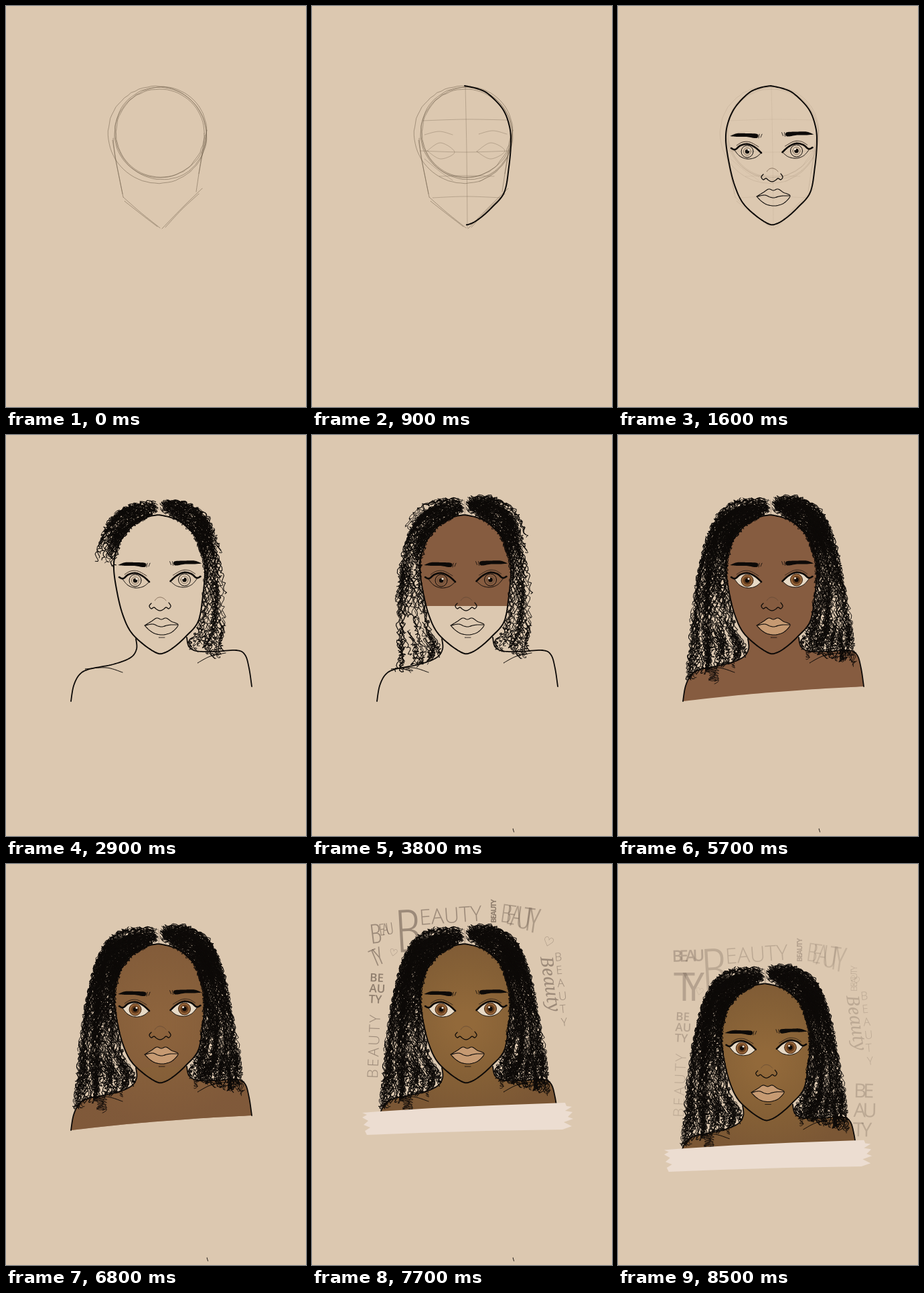
These frames come from a looping animation (448x598 px, 8600 ms). An HTML page with a canvas:

```html
<!DOCTYPE html>
<html lang="en">
<head>
<meta charset="utf-8">
<title>Portrait drawing</title>
<style>
  html, body { margin: 0; width: 100%; height: 100%; overflow: hidden; background: #dcc8b0; }
  canvas { display: block; width: 448px; height: 598px; }
</style>
</head>
<body>
<canvas id="stage" width="448" height="598"></canvas>
<script>
const ctx = document.getElementById('stage').getContext('2d');
const LOOP = 8600, STEP = 100;
const PAPER = '#dcc8b0', INK = '#0d0a08', PENCIL = '#74634f';

let seed = 7;
function rand(a = 0, b = 1) {
  seed = (seed * 1664525 + 1013904223) % 4294967296;
  return a + (b - a) * seed / 4294967296;
}
const lerp = (a, b, k) => a + (b - a) * k;
const ramp = (t, from, to) => Math.min(1, Math.max(0, (t - from) / (to - from)));

// Catmull-Rom curve through flat x,y pairs, sampled as points
function curve(flat, samples = 10) {
  const p = [], out = [];
  for (let i = 0; i < flat.length; i += 2) p.push([flat[i], flat[i + 1]]);
  for (let i = 0; i < p.length - 1; i++) {
    const a = p[Math.max(0, i - 1)], b = p[i], c = p[i + 1], d = p[Math.min(p.length - 1, i + 2)];
    for (let s = 0; s < samples; s++) {
      const k = s / samples;
      out.push([0, 1].map(j => b[j] + .5 * k * (c[j] - a[j] + k * (2 * a[j] - 5 * b[j] + 4 * c[j] - d[j]
        + k * (3 * (b[j] - c[j]) + d[j] - a[j])))));
    }
  }
  out.push(p[p.length - 1]);
  return out;
}

function along(points, v) {
  const f = Math.min(.9999, Math.max(0, v)) * (points.length - 1), i = Math.floor(f);
  return [lerp(points[i][0], points[i + 1][0], f - i), lerp(points[i][1], points[i + 1][1], f - i)];
}

function trace(points, part = 1) {
  ctx.beginPath();
  const n = Math.ceil(points.length * part);
  for (let i = 0; i < n; i++) ctx.lineTo(...points[i]);
}
function line(points, part = 1, width = 1.4, color = INK) {
  if (part <= 0) return;
  trace(points, part);
  ctx.lineWidth = width;
  ctx.strokeStyle = color;
  ctx.stroke();
}
function fill(points, color) {
  trace(points);
  ctx.fillStyle = color;
  ctx.fill();
}

// ---- Face and body ----
const face = curve([228,119, 246,123, 263,131, 285,154, 295,180, 297,205, 294,240, 287,278, 268,301, 250,317,
  236,325, 225,325, 205,312, 186,293, 174,267, 166,235, 161,200, 164,175, 175,151, 195,130, 212,122, 228,119]);
const leftShoulder = curve([194,304, 195,319, 186,332, 160,342, 125,349, 110,357, 101,374, 97,397]);
const rightShoulder = curve([270,302, 273,315, 284,322, 310,323, 344,321, 357,328, 363,348, 367,375]);
const collarbones = [curve([118,349, 150,347, 174,354]), curve([286,340, 305,330, 328,325])];
const body = [...leftShoulder, ...curve([97,397, 180,388, 280,380, 367,375]), ...[...rightShoulder].reverse()];

const lidTop = curve([169,212, 175,214, 183,208, 194,206, 205,211, 214,219]);
const lidBottom = curve([214,219, 205,226, 193,228, 182,224, 174,215]);
const crease = curve([177,208, 186,203, 197,203, 210,210]);
const brow = curve([167,194, 178,190, 192,190, 208,191, 207,197, 192,195, 178,195, 167,194]);
const nose = [
  curve([217,251, 214,255, 217,259, 221,257, 225,260, 230,262, 235,260, 239,257, 243,259, 246,255, 243,250]),
];
const noseTip = curve([222,247, 226,243, 231,242, 236,244, 239,247]);
const lips = curve([207,284, 217,278, 225,273, 232,275, 239,273, 247,278, 257,283, 249,293, 240,297, 232,298,
  222,296, 214,291, 207,284]);
const mouth = curve([208,284, 219,282, 227,285, 233,286, 240,284, 247,283, 256,283]);

function mirrored(side, draw) {
  ctx.save();
  if (side) { ctx.translate(459.5, -1); ctx.scale(-1, 1); }
  draw();
  ctx.restore();
}

function circle(x, y, r, color, width) {
  ctx.beginPath();
  ctx.arc(x, y, r, 0, 7);
  if (width) { ctx.lineWidth = width; ctx.strokeStyle = color; ctx.stroke(); }
  else { ctx.fillStyle = color; ctx.fill(); }
}

function drawEye(t, side) {
  const start = 1050 + side * 150, part = ramp(t, start, start + 200);
  if (!part) return;
  mirrored(side, () => {
    ctx.save();
    if (t >= 4100) fill([...lidTop.slice(10), ...lidBottom], '#e7d9c5');
    trace([...lidTop.slice(10), ...lidBottom]);
    ctx.clip();
    if (part === 1) {
      if (t >= 4200) circle(193, 217, 9, '#946338');
      circle(193, 217, 9, t >= 4200 ? '#3d2412' : INK, 1);
      if (t >= 4200) circle(193, 217, 6, '#633c1d');
      else circle(193, 217, 5.5, '#564839', .7);
      circle(193, 217, 3.2, INK);
      circle(195, 214.5, 1.5, '#f3e9dc');
    }
    ctx.restore();
    line(lidTop, part, 2.6);
    line(lidBottom, part, 1);
    line(crease, part, .9, '#2d2119');
  });
}

function drawBrow(t, side) {
  if (t < 1300 + side * 100) return;
  mirrored(side, () => {
    if (side) ctx.translate(0, -1.5);
    fill(brow, INK);
    line([[211, 191], [210, 197]], 1, .8);
    line([[215, 191], [213, 196]], 1, .8);
  });
}

function drawSkin(t) {
  const part = ramp(t, 3600, 4000);
  if (!part) return;
  ctx.save();
  ctx.beginPath();
  ctx.rect(0, 110, 448, 290 * part);
  ctx.clip();
  fill(body, '#865c40');
  fill(face, '#865c40');
  const warmth = ramp(t, 6300, 7200);
  if (warmth) {
    const glow = ctx.createRadialGradient(229, 235, 15, 229, 235, 150);
    glow.addColorStop(0, '#92693a');
    glow.addColorStop(.5, '#856036');
    glow.addColorStop(1, '#7b5735');
    ctx.globalAlpha = warmth;
    fill(body, glow);
    fill(face, glow);
  }
  ctx.restore();
  if (t >= 4000) fill(lips, '#c69a72');
}

function drawFace(t) {
  drawSkin(t);
  line(face, ramp(t, 700, 1100), 2);
  for (const side of [0, 1]) { drawEye(t, side); drawBrow(t, side); }
  nose.forEach(n => line(n, ramp(t, 1400, 1500), 1.3));
  line(noseTip, ramp(t, 1400, 1500), .7, '#5d4736');
  line(lips, ramp(t, 1400, 1600), 1.1);
  line(mouth, ramp(t, 1500, 1600), 1.1);
  line([[228, 302], [237, 302]], ramp(t, 1600, 1700), .8);
  line(leftShoulder, ramp(t, 1600, 1800), 1.8);
  line(rightShoulder, ramp(t, 1700, 1900), 1.8);
  collarbones.forEach(c => line(c, ramp(t, 1800, 2000), 1));
}

// ---- Pencil construction ----
const oval = (cx, cy, rx, ry, tilt) => Array.from({ length: 73 }, (_, i) => {
  const a = i / 36 * Math.PI, x = rx * Math.cos(a), y = ry * Math.sin(a), wob = rand(-.4, .4);
  return [cx + x * Math.cos(tilt) - y * Math.sin(tilt) + wob, cy + x * Math.sin(tilt) + y * Math.cos(tilt) + wob];
});
const construction = [
  oval(229, 190, 67, 66, 0), oval(232, 188, 68, 67, -.6), oval(226, 192, 74, 72, .5), oval(231, 190, 70, 67, .9),
  curve([160,197, 163,225, 169,255, 175,285]), curve([159,200, 166,240, 174,280]),
  curve([175,285, 200,307, 230,331]), curve([177,291, 205,313, 226,329]),
  curve([297,192, 291,230, 284,277]), curve([300,185, 294,218, 288,250]),
  curve([293,272, 265,299, 233,332]), curve([288,280, 262,304, 238,330]),
];
const guides = [
  [229,119, 231,220, 232,331], [166,171, 229,169, 291,170], [161,216, 229,218, 297,216],
  [168,228, 190,246, 210,260], [292,226, 276,245, 250,262], [190,254, 230,253, 272,254],
  [180,286, 230,284, 283,286], [172,216, 192,204, 213,218, 192,228, 172,216],
  [246,217, 267,204, 288,216, 267,228, 246,217], [168,192, 190,187, 210,192], [249,191, 270,186, 291,191],
].map(g => curve(g));

function drawSketch(t) {
  const strength = t < 1000 ? 1 : .35 * (1 - ramp(t, 1500, 1900));
  if (!strength) return;
  ctx.save();
  ctx.globalAlpha = .55 * strength;
  construction.forEach(c => line(c, 1, 1, PENCIL));
  ctx.globalAlpha = .4 * strength;
  guides.forEach((g, i) => line(g, ramp(t, i * 70, 100 + i * 70), .9, PENCIL));
  ctx.restore();
}

// ---- Hair: curls run between an inner and an outer edge on each side ----
const hairEdges = [
  [curve([226,113, 203,126, 181,142, 167,168, 162,200, 165,240, 175,285, 191,316, 188,333]),
   curve([225,95, 190,95, 159,109, 138,140, 125,185, 115,235, 108,290, 105,330, 101,367])],
  [curve([231,113, 252,124, 276,142, 290,168, 295,200, 294,240, 286,285, 273,308, 278,321]),
   curve([232,93, 268,92, 300,109, 317,140, 331,185, 341,235, 348,285, 352,315, 355,345])],
];
const curls = [];

function addCurls(side, count, [uMin, uMax], [vMin, vMax], from, to) {
  const [inner, outer] = hairEdges[side];
  for (let n = 0; n < count; n++) {
    const u = rand(uMin, uMax), drift = rand(-.1, .1), v = rand(vMin, vMax);
    const span = Math.min(rand(.11, .2), rand(.97, 1) - v);
    const phase = rand(0, 6), size = rand(1.8, 3.2), steps = Math.round(span * 165);
    const path = new Path2D();
    for (let i = 0; i <= steps; i++) {
      const k = i / steps, a = along(inner, v + span * k), b = along(outer, v + span * k);
      const w = Math.min(1, Math.max(0, u + drift * k)), turn = phase + i * 1.2;
      path.lineTo(lerp(a[0], b[0], w) + size * Math.sin(turn), lerp(a[1], b[1], w) + size * Math.cos(turn * .8));
    }
    const order = (v - vMin) / (vMax - vMin);
    curls.push({ path, time: lerp(from, to, order), width: rand(.8, 1.2) });
  }
}
addCurls(0, 120, [0, .75], [0, .33], 1900, 2700);
addCurls(1, 120, [0, .75], [0, .3], 2000, 2500);
addCurls(1, 85, [0, .66], [.28, .9], 2400, 2800);
addCurls(0, 85, [0, .72], [.33, .9], 2950, 3600);
for (const side of [0, 1]) {
  addCurls(side, 75, [.6, 1], [0, .9], 3600, 4300);
  addCurls(side, 50, [.1, 1], [0, .35], 3700, 4300);
  addCurls(side, 110, [0, 1], [.2, .9], 4500, 5600);
  addCurls(side, 100, [0, 1], [.15, .9], 5700, 6900);
}

const scribble = (x, y, w, h, turns) => Array.from({ length: turns * 5 }, (_, i) =>
  [x + w * Math.sin(i * 1.25) + rand(-1, 1), y + h * i / (turns * 5) + 2 * Math.cos(i * 1.1)]);
const tufts = [scribble(141, 347, 5, 20, 9), scribble(147, 350, 3, 20, 6), scribble(283, 321, 3, 13, 5),
  scribble(172, 340, 2, 7, 3)];

function drawHair(t) {
  ctx.strokeStyle = INK;
  for (const c of curls) {
    if (c.time > t) continue;
    ctx.lineWidth = c.width;
    ctx.stroke(c.path);
  }
  if (t >= 2200) line([[227, 97], [229, 107], [228, 118]], 1, 1.1, t < 3700 ? PAPER : '#a6927f');
  tufts.forEach(s => line(s, ramp(t, 3700, 4200), .8));
}

// ---- Brushed band ----
const band = [[75,371], [100,369], [180,364], [270,360], [378,356], [380,361], [388,362], [378,368], [389,370],
  [382,377], [390,380], [376,385], [388,391], [374,396], [260,398], [160,401], [82,404], [79,398], [87,393],
  [77,389], [84,383], [75,378], [82,374]];
function drawBand(t) {
  const part = ramp(t, 7200, 7500);
  if (!part) return;
  ctx.save();
  ctx.beginPath();
  ctx.rect(70, 340, 325 * part, 80);
  ctx.clip();
  fill(band, '#ecddd1');
  ctx.restore();
}

// ---- Lettering ----
const SANS = '"Open Sans", sans-serif', SCRIPT = '"Noto Serif", serif';
const MOVE = 8300;
const lettering = [
  { text: 'B', x: 126, y: 132, size: 88, angle: -.06, start: 7200, style: '300 condensed' },
  { text: 'EAUTY', x: 161, y: 91, size: 32, angle: -.07, start: 7200 },
  { text: 'BEAUTY', x: 275, y: 88, size: 11, angle: -1.57, style: '700 condensed', start: 7300, tight: .8, alpha: .6 },
  { text: 'BEAUTY', x: 280, y: 86, size: 38, angle: .14, grow: 1.06, tight: .48, alpha: .36, style: '300 condensed', start: 7300 },
  { text: '♡', x: 343, y: 120, size: 19, angle: .3, start: 7500 },
  { text: 'B', x: 88, y: 119, size: 40, angle: -.12, style: '300 condensed', tight: .7, start: 7400, end: MOVE },
  { text: 'EAU', x: 101, y: 107, size: 24, angle: -.15, style: '300 condensed', tight: .55, start: 7400, end: MOVE },
  { text: 'TY', x: 93, y: 154, size: 36, angle: -.4, style: '300 condensed', tight: .55, start: 7400, end: MOVE },
  { text: '♡', x: 114, y: 136, size: 15, angle: .2, start: 7500 },
  { text: 'BE\nAU\nTY', x: 86, y: 175, size: 17, angle: .05, style: '600', line: 16, alpha: .6, start: 7400 },
  { text: 'BEAUTY', x: 98, y: 320, size: 22, angle: -1.53, tight: 1.25, start: 7500 },
  { text: 'Beauty', x: 341, y: 139, size: 26, angle: 1.42, style: 'italic 400', font: SCRIPT, start: 7500 },
  { text: 'B\nE\nA\nU\nT\nY', x: 363, y: 145, size: 17, angle: -.1, line: 19.5, start: 7500 },
  { text: 'BE\nAU\nTY', x: 352, y: 290, size: 29, angle: .02, style: '400 condensed', tight: .75, line: 29, start: 7800 },
  { text: 'BEAUTY', x: 357, y: 132, size: 13, angle: -1.57, start: 7900, tight: .8 },
  { text: 'BEAU', x: 81, y: 88, size: 24, angle: -.03, style: '600 condensed', tight: .68, alpha: .6, start: MOVE },
  { text: 'TY', x: 83, y: 146, size: 58, angle: 0, style: '400 condensed', tight: .42, alpha: .6, start: MOVE },
];

function write(item, t) {
  const { text, x, y, size, angle, start, end = LOOP, style = '300', font = SANS, grow = 1, tight = 1, line = 0, alpha = .5 } = item;
  if (t < start || t >= end) return;
  let left = Math.ceil(text.length * ramp(t, start - 100, start + 200));
  ctx.save();
  ctx.translate(x, y);
  ctx.rotate(angle);
  ctx.fillStyle = '#5c4c41';
  ctx.globalAlpha = alpha * (t < MOVE ? 1 : .5);
  let px = 0, py = 0, s = size;
  for (const letter of text) {
    if (left-- <= 0) break;
    if (letter === '\n') { px = 0; py += line; continue; }
    ctx.font = `${style} ${s}px ${font}`;
    ctx.fillText(letter, px, py + (s - size) * .72);
    px += ctx.measureText(letter).width * tight;
    s *= grow;
  }
  ctx.restore();
}

function draw(t) {
  const moved = t >= MOVE;
  ctx.fillStyle = PAPER;
  ctx.fillRect(0, 0, 448, 598);
  ctx.lineJoin = ctx.lineCap = 'round';

  ctx.save();
  if (moved) ctx.translate(0, 58);
  lettering.forEach(item => write(item, t));
  ctx.restore();

  ctx.save();
  if (moved) { ctx.translate(-5, 61); ctx.scale(.985, .985); }
  drawSketch(t);
  drawFace(t);
  drawHair(t);
  drawBand(t);
  ctx.restore();

  if (t >= 3500 && !moved) line([[300, 587], [301.5, 592]], 1, .9);
}

let shown = -1;
function frame() {
  const t = Math.floor(performance.now() % LOOP / STEP) * STEP;
  if (t !== shown) draw(shown = t);
  requestAnimationFrame(frame);
}
frame();
</script>
</body>
</html>
```
